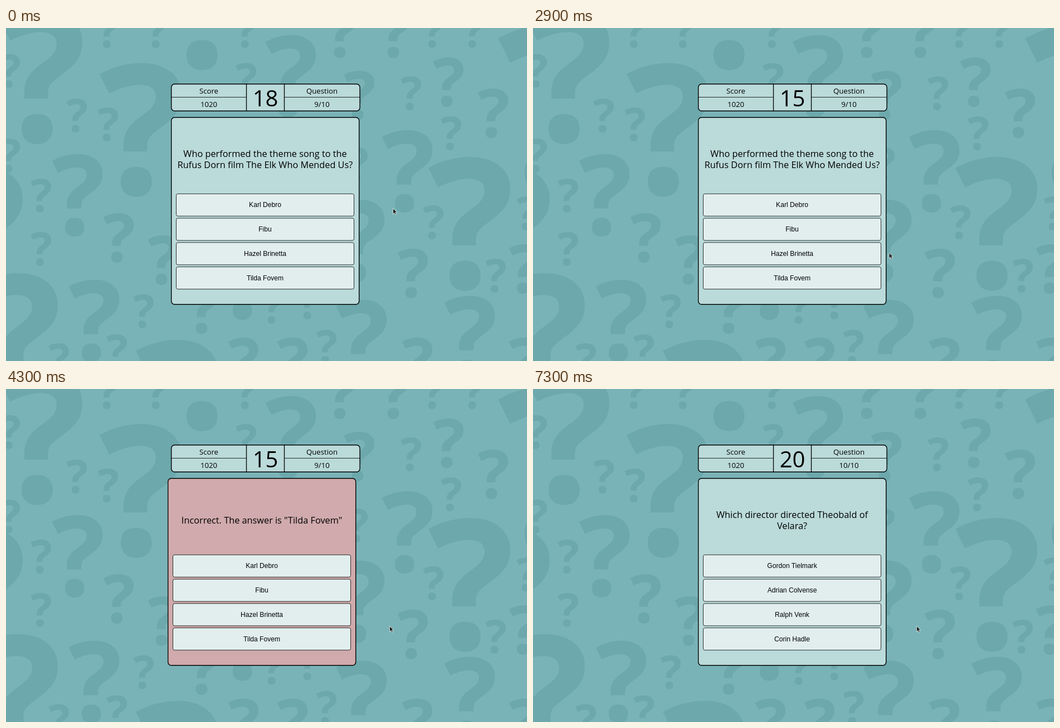
These frames come from a looping animation (935x599 px, 8000 ms). An HTML page:

```html
<!DOCTYPE html>
<html lang="en">
<head>
<meta charset="utf-8">
<title>Quiz</title>
<style>
  html, body { margin: 0; width: 100%; height: 100%; overflow: hidden; background: #7ab3b7; }
  svg { display: block; }
  text { text-anchor: middle; font-family: "Open Sans", "Noto Sans", sans-serif; font-weight: 500; }
  #marks text { text-anchor: start; font-weight: 700; fill: #6ca8ac; }
  #bar text { font-size: 13.2px; }
  #bar #timer { font-size: 40px; }
  #lines text { font-size: 16.3px; }
  #answers text { font: 12.1px "Liberation Sans", Arial, sans-serif; }
  #answers rect { fill: #e2eeee; stroke: #000; stroke-width: .8; }
  #answers .hover rect { fill: #b0d3d4; }
  .box { fill: #bbdada; stroke: #000; stroke-width: 1.4; }
</style>
</head>
<body>
<svg width="935" height="599" viewBox="0 0 935 599">
  <g id="marks"></g>
  <g id="bar">
    <rect class="box" x="296.7" y="100.7" width="338.4" height="48.6" rx="6"/>
    <path d="M431.5 101V149M499.5 101V149" stroke="#000" stroke-width="1.3"/>
    <path d="M297 124.5H431M500 124.5H635" stroke="#000" stroke-width=".8"/>
    <text x="364" y="118">Score</text>
    <text x="364" y="142">1020</text>
    <text id="timer" x="465.5" y="141"></text>
    <text x="567" y="118">Question</text>
    <text id="count" x="567" y="142"></text>
  </g>
  <g id="card">
    <rect id="panel" class="box" x="296.7" y="160.7" width="337" height="336.6" rx="6"/>
    <g id="lines"></g>
    <g id="answers"></g>
  </g>
  <g id="pointer" stroke-linejoin="round">
    <path id="arrow" d="M.5 .5V10.6L2.9 8.4 4.6 12 6.3 11.2 4.7 7.7H7.6Z" fill="#1c1c1c" stroke="#e8f0f0" stroke-width=".8"/>
    <path id="hand" d="M-2.2 1Q-1.2-.6 .2 .9L2.3 3.6 6 3.8Q8 4.2 7.8 6.5L7 10.5H.8L-3 7Q-3.4 5.6-1.6 5.8L.2 6.6Z" fill="#fff" stroke="#222" stroke-width=".9"/>
  </g>
</svg>
<script>
const LOOP = 8000, HOVER = 3400, ANSWERED = 3700, LEAVE = 3900, NEXT = 7300;
const WIDTH = 935, HEIGHT = 599;
const $ = id => document.getElementById(id);

function add(parent, tag, attrs, content = '') {
  const node = document.createElementNS('http://www.w3.org/2000/svg', tag);
  for (const name in attrs) node.setAttribute(name, attrs[name]);
  node.textContent = content;
  return parent.appendChild(node);
}

// Large question marks by height (left, top); the smaller ones fill the gaps between them.
const large = {
  300: [[882, -6]],
  240: [[-11, -32], [285, -165], [167, 63], [757, 232], [-118, 250], [-55, 441], [232, 561]],
  148: [[465, 12], [674, 183], [82, 226], [588, 308], [112, 452], [383, 376], [592, 488], [786, 481]]
};
const marks = Object.entries(large).flatMap(([h, places]) => places.map(([x, y]) => ({ x, y, h: +h })));

// A mark seen as equal discs along its stroke, in units of its height.
const stroke = [[.09, .14], [.29, .1], [.49, .22], [.42, .4], [.27, .57], [.267, .88]];
const discs = ({ x, y, h }) => stroke.map(([dx, dy]) => [x + dx * h, y + dy * h]);

function clearance(a, b) {
  const others = discs(b);
  const nearest = Math.min(...discs(a).flatMap(([x, y]) => others.map(([u, v]) => Math.hypot(x - u, y - v))));
  return nearest - (a.h + b.h) * .1;
}

const behindCard = (x, y) => x > 285 && x < 630 && y > 100 && y < 490;

function fillGaps(h, count) {
  const spots = [];
  for (let x = -.2 * h; x < WIDTH - .3 * h; x += 8)
    for (let y = -.4 * h; y < HEIGHT - .4 * h; y += 8)
      if (!behindCard(x + .3 * h, y + .5 * h)) spots.push({ x, y, h, room: Infinity });
  const crowd = mark => spots.forEach(spot => spot.room = Math.min(spot.room, clearance(spot, mark)));
  marks.forEach(crowd);
  while (count--) {
    const best = spots.reduce((a, b) => b.room > a.room ? b : a);
    marks.push(best);
    crowd(best);
  }
}
fillGaps(89, 14);
fillGaps(60, 24);

for (const { x, y, h } of marks)
  add($('marks'), 'text', { x, y: y + h * .985, 'font-size': h / .735 }, '?');

const lines = [226, 246, 236].map(y => add($('lines'), 'text', { x: 465, y: y + 5.8 }));

const answers = [0, 1, 2, 3].map(i => {
  const group = add($('answers'), 'g', {}), y = 298.3 + i * 43.8;
  add(group, 'rect', { x: 305.5, y, width: 319, height: 40, rx: 3 });
  return { group, label: add(group, 'text', { x: 465, y: y + 24 }) };
});

const first = {
  lines: ['Who performed the theme song to the', 'Rufus Dorn film The Elk Who Mended Us?', ''],
  answers: ['Karl Debro', 'Fibu', 'Hazel Brinetta', 'Tilda Fovem']
};
const wrong = { lines: ['', '', 'Incorrect. The answer is "Tilda Fovem"'], answers: first.answers };
const second = {
  lines: ['Which director directed Theobald of', 'Velara?', ''],
  answers: ['Gordon Tielmark', 'Adrian Colvense', 'Ralph Venk', 'Corin Hadle']
};

// Paused animations, positioned by the clock in draw().
const timing = { duration: 1200, fill: 'both' };
const reactions = [
  $('card').animate({
    transform: [0, -1, 2, -6, 6, -6, 6, -6, 2, -1, 0].map(x => `translateX(${x}px)`),
    easing: 'ease'
  }, timing),
  $('panel').animate({ fill: ['#bbdada', '#d69ea0'] }, { ...timing, easing: 'ease' })
];
reactions.forEach(reaction => reaction.pause());

const pointerPath = [
  { at: 1500, x: 694, y: 324 }, { at: 2000, x: 685, y: 356 }, { at: 2500, x: 655, y: 399 },
  { at: HOVER, x: 618, y: 410 }, { at: 3750, x: 618, y: 410 }, { at: 4300, x: 688, y: 426 }
];

function pointerAt(t) {
  const next = pointerPath.findIndex(point => point.at > t);
  const to = pointerPath.at(next), from = next > 0 ? pointerPath[next - 1] : to;
  const k = to === from ? 0 : (t - from.at) / (to.at - from.at);
  return next < 0 ? [to.x, to.y] : [from.x + (to.x - from.x) * k, from.y + (to.y - from.y) * k];
}

function draw(now) {
  const t = Math.floor(now % LOOP / 100) * 100;
  const state = t < ANSWERED ? first : t < NEXT ? wrong : second;
  lines.forEach((line, i) => line.textContent = state.lines[i]);

  const hovering = t >= HOVER && t < LEAVE;
  answers.forEach(({ group, label }, i) => {
    label.textContent = state.answers[i];
    group.setAttribute('class', hovering && i === 2 ? 'hover' : '');
  });

  // The countdown ticks every second until the answer stops it.
  const ticks = Math.floor((Math.min(t, ANSWERED) + 100) / 1000);
  $('timer').textContent = state === second ? 20 : 18 - ticks;
  $('count').textContent = state === second ? '10/10' : '9/10';

  const elapsed = state === wrong ? Math.max(0, t - ANSWERED - 10) : 0;
  reactions.forEach(reaction => reaction.currentTime = elapsed);

  $('pointer').setAttribute('transform', `translate(${pointerAt(t)})`);
  $('arrow').style.display = hovering ? 'none' : '';
  $('hand').style.display = hovering ? '' : 'none';
}

function loop() {
  draw(performance.now());
  requestAnimationFrame(loop);
}
loop();
</script>
</body>
</html>
```
